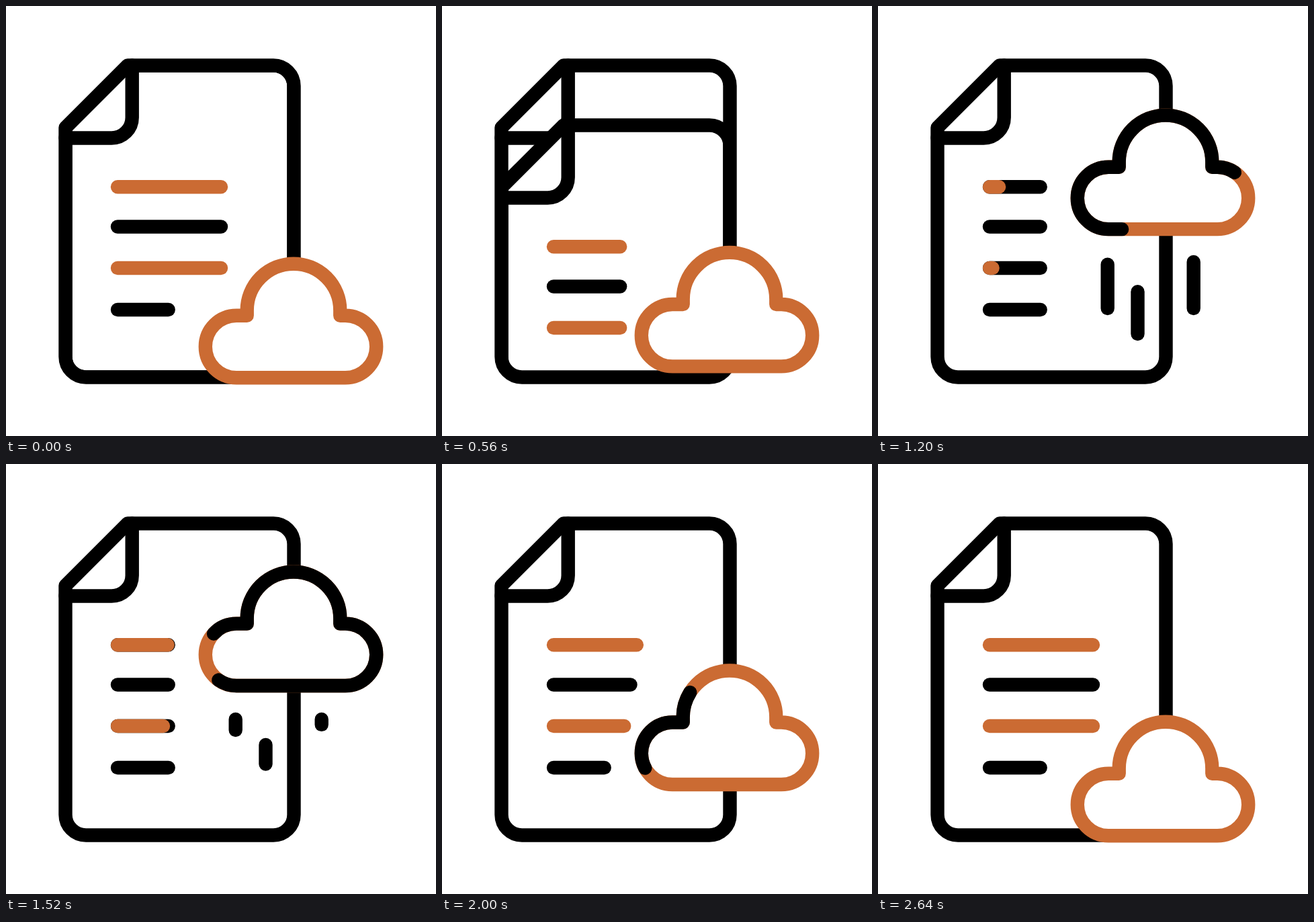
These frames come from a looping animation (640x640 px, 3 s). An HTML page with a canvas:

```html
<!DOCTYPE html>
<html lang="en">
<head>
<meta charset="utf-8">
<title>Document and cloud</title>
<style>
  html, body { margin: 0; width: 100%; height: 100%; overflow: hidden; background: #fff; }
  canvas { display: block; }
</style>
</head>
<body>
<canvas id="stage" width="640" height="640"></canvas>
<script>
const ctx = document.getElementById('stage').getContext('2d');
const LOOP = 3000, STEP = 40;
const BLACK = '#000', ORANGE = '#cb6b33';

const outline = new Path2D('M181 88.5H398a30.5 30.5 0 0 1 30.5 30.5V522a30.5 30.5 0 0 1-30.5 30.5H119A30.5 30.5 0 0 1 88.5 522V181Z');
const fold = new Path2D('M187.7 88.5V166a30.5 30.5 0 0 1-30.5 30.5H88.5');
// Runs clockwise from the right end of the base.
const cloud = new Path2D('M505 553.2H343a46.2 46.2 0 0 1 0-92.4H358.7V453a69.3 69.3 0 0 1 138.6 0V460.8H505a46.2 46.2 0 0 1 0 92.4Z');
const cloudLength = 162 + 15.7 + 7.7 + 2 * 7.8 + Math.PI * (2 * 46.2 + 69.3);

const LINE_X = 166, SHORT = 75.7, LONG = 154;
const lineYs = [269.3, 328.5, 390, 452];
const drops = [
  { x: 341.7, y: 450, grow: 872, shrink: 1299 },
  { x: 386.5, y: 488, grow: 888, shrink: 1340 },
  { x: 469.7, y: 450, grow: 837, shrink: 1267 }
];

// Eases along cubic-bezier(x1, 0, x2, 1); the defaults give a smoothstep.
function ease(t, start, duration, x1 = 1 / 3, x2 = 2 / 3) {
  const u = (t - start) / duration;
  if (u <= 0) return 0;
  if (u >= 1) return 1;
  let low = 0, high = 1;
  for (let i = 0; i < 24; i++) {
    const s = (low + high) / 2, r = 1 - s;
    if (3 * x1 * s * r * r + 3 * x2 * s * s * r + s * s * s < u) low = s;
    else high = s;
  }
  return low * low * (3 - 2 * low);
}

function stroke(path, color) {
  ctx.strokeStyle = color;
  ctx.stroke(path);
}

function fill(path) {
  ctx.fillStyle = '#fff';
  ctx.fill(path);
}

function segment(x1, y1, x2, y2, color) {
  const path = new Path2D();
  path.moveTo(x1, y1);
  path.lineTo(x2, y2);
  stroke(path, color);
}

function textLine(row, length, color) {
  if (length > 0) segment(LINE_X, lineYs[row], LINE_X + length, lineYs[row], color);
}

function drawNewLines(t) {
  for (let row = 0; row < 4; row++) {
    const black = SHORT * ease(t, 510 + 42 * row, 500);
    const extra = row < 3 ? (LONG - SHORT) * ease(t, 1596 + 56 * row, 700) : 0;
    const tint = row % 2 ? 0 : ease(t, 1065 + 31 * row, 490);
    if (tint < 1) textLine(row, black + extra, BLACK);
    textLine(row, SHORT * tint + (tint ? extra : 0), ORANGE);
  }
}

function drawOldPage(t) {
  const slide = ease(t, 240, 720, 0.78, 0.56);
  if (slide === 1) return;
  ctx.save();
  ctx.clip(outline);
  ctx.translate(0, 500 * slide);
  fill(outline);
  for (let row = 0; row < 4; row++) {
    const last = row === 3;
    const left = 1 - ease(t, 270, last ? 280 : 720);
    textLine(row, (last ? SHORT : LONG) * left, row % 2 ? BLACK : ORANGE);
  }
  stroke(fold, BLACK);
  stroke(outline, BLACK);
  ctx.restore();
}

function drawDrops(t) {
  for (const { x, y, grow, shrink } of drops) {
    const head = ease(t, grow, 390), tail = ease(t, shrink, 320);
    if (head > 0 && tail < 1) segment(x, y - 70 * tail, x, y - 70 * head, BLACK);
  }
}

function drawCloud(t) {
  const lift = ease(t, 240, 1123, 0.763, 0.201) - ease(t, 1440, 1200, 0.652, 0.136);
  const head = ease(t, 800, 963, 0.169, 0.374);
  const tail = ease(t, 1445, 1039, 0.169, 0.374);
  ctx.save();
  ctx.translate(0, -224 * lift);
  fill(cloud);
  stroke(cloud, ORANGE);
  if (head > tail) {
    const length = (head - tail) * cloudLength;
    const begin = 51 + 0.284 * (t - 880) + tail * cloudLength;
    ctx.setLineDash([length, cloudLength - length]);
    ctx.lineDashOffset = -begin;
    stroke(cloud, BLACK);
  }
  ctx.restore();
}

function draw() {
  const t = Math.floor(performance.now() % LOOP / STEP) * STEP;
  ctx.fillStyle = '#fff';
  ctx.fillRect(0, 0, 640, 640);
  ctx.lineWidth = 20.4;
  ctx.lineCap = ctx.lineJoin = 'round';
  stroke(fold, BLACK);
  drawNewLines(t);
  drawOldPage(t);
  stroke(outline, BLACK);
  drawDrops(t);
  drawCloud(t);
  requestAnimationFrame(draw);
}
draw();
</script>
</body>
</html>
```
